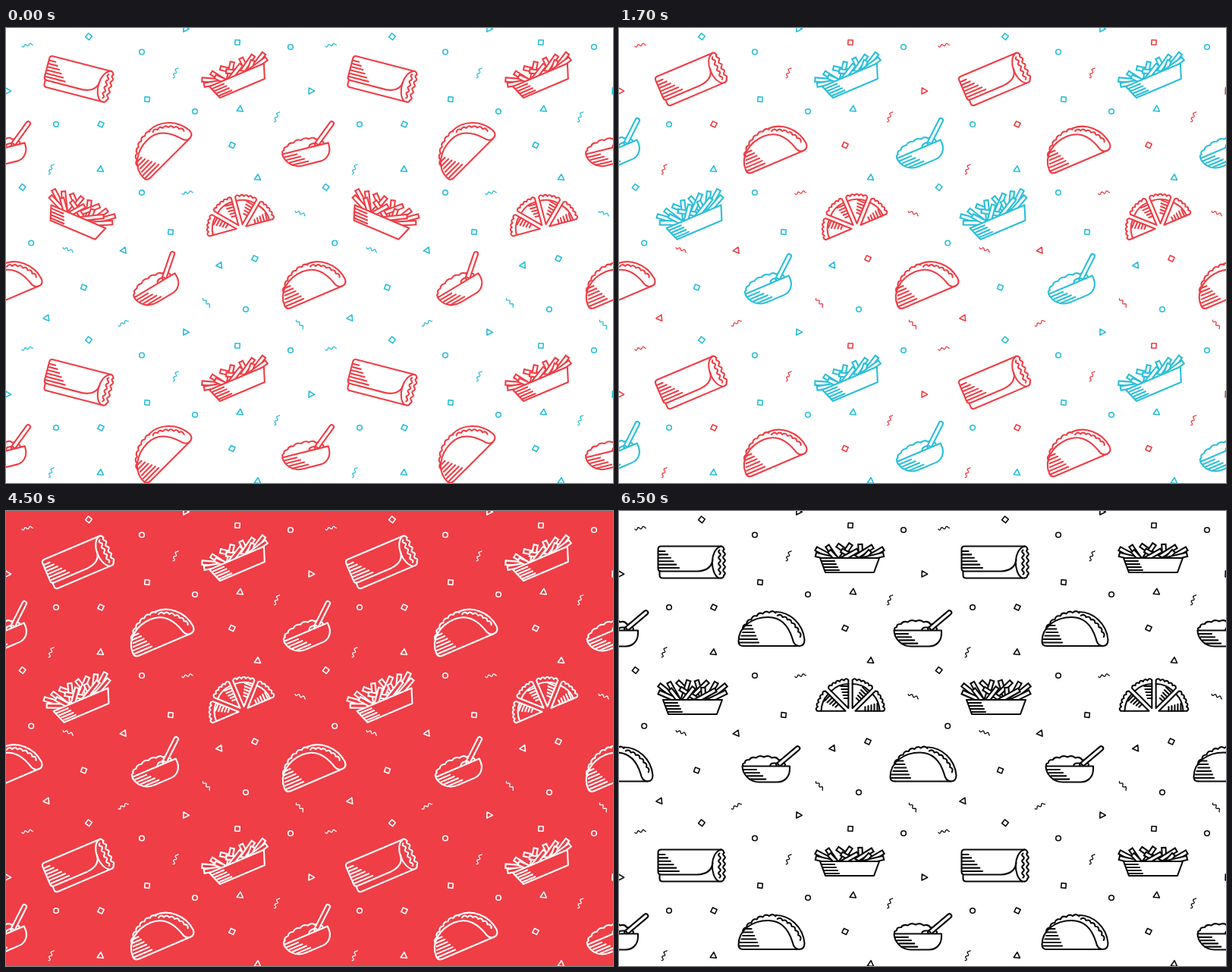
Animation, 800 px wide and 600 px high, one loop 8000 ms. Source, as an HTML page with a canvas:

```html
<!DOCTYPE html>
<html lang="en">
<head>
<meta charset="utf-8">
<title>Snack pattern</title>
<style>
html, body { margin: 0; width: 100%; height: 100%; overflow: hidden; background: #fff; }
canvas { display: block; }
</style>
</head>
<body>
<canvas id="c" width="800" height="600"></canvas>
<script>
const ctx = document.getElementById('c').getContext('2d');
const RED = '#ef3e46', TEAL = '#2bbfd9', WHITE = '#ffffff', BLACK = '#0a0a0a';
const LOOP = 8000, TILE = 400, RAD = Math.PI / 180, LINE = 2.1;
let paper;

function stroke(d) { ctx.stroke(new Path2D(d)); }

function solid(d) {
  const p = new Path2D(d);
  ctx.fillStyle = paper;
  ctx.fill(p);
  ctx.stroke(p);
}

// n bumps along an elliptic arc, bulging outwards by h
function bumps(cx, cy, rx, ry, from, to, n, h) {
  const at = (i, grow) => {
    const a = (from + (to - from) * i / n) * RAD;
    return `${cx + (rx + grow) * Math.cos(a)} ${cy + (ry + grow) * Math.sin(a)}`;
  };
  let d = 'M' + at(0, 0);
  for (let i = 1; i <= n; i++) d += `Q${at(i - .5, h)} ${at(i, 0)}`;
  return d;
}

// Horizontal shading: each row starts slant further on and is grow longer
function hatch(x, y, step, n, len, grow, slant = 0) {
  for (let i = 0; i < n; i++) stroke(`M${x + slant * i} ${y + step * i}h${len + grow * i}`);
}

function squiggle(len, amp, cycles) {
  ctx.beginPath();
  for (let x = 0; x <= len; x += .5) {
    ctx.lineTo(x - len / 2, amp * Math.sin(x / len * cycles * 2 * Math.PI));
  }
  ctx.stroke();
}

// Outlined bar filled with the paper colour
function bar(x1, y1, x2, y2, width, cap) {
  const color = ctx.strokeStyle;
  ctx.save();
  ctx.lineCap = cap;
  for (const [c, w] of [[color, width], [paper, width - 2 * LINE]]) {
    ctx.strokeStyle = c;
    ctx.lineWidth = w;
    stroke(`M${x1} ${y1}L${x2} ${y2}`);
  }
  ctx.restore();
}

function place(draw, x, y, deg) {
  ctx.save();
  ctx.translate(x, y);
  ctx.rotate(deg * RAD);
  draw();
  ctx.restore();
}

function burrito() {
  stroke('M39-21H-40Q-44-21-44-17V8Q-44 12-40 12H8Q26 11 28-3');
  stroke('M-42 12V17Q-42 21-38 21H39');
  stroke('M39-21C24-17 24 14 36 21');
  stroke('M39-21q3 0 4 4M43 17q-1 4-4 4');
  place(() => squiggle(34, 1.3, 4), 43, 0, 90);
  place(() => squiggle(32, 1.3, 4), 37, 0, 90);
  hatch(-43, -14.5, 4.4, 6, 8, 3.7);
}

function taco() {
  stroke('M-37 22H37Q44 22 44 14C42-8 24-23 6-23');
  stroke('M-37 22Q-43 22-43 16C-43-4-24-16-4-16C13-16 23-4 28 12Q30 22 37 22');
  stroke(bumps(0, 22, 43, 44, 210, 278, 6, 4));
  stroke(bumps(0, 22, 40, 41, 282, 343, 6, 4));
  hatch(-34, -5, 4.5, 6, 8, 3.6, -1.7);
}

function bowl() {
  stroke(bumps(-9, 2, 27, 12, 180, 360, 8, 3.5));
  bar(10, 0, 35.5, -21.5, 7.6, 'round');
  stroke(bumps(5, 2, 6, 4, 180, 360, 2, 2));
  solid('M-37.5 2H25V6C25 17 17 23 9 23H-15C-28 23-37 13-37.5 2Z');
  hatch(-36, 6.5, 4.2, 4, 17, 1.5, 2.6);
}

function tray(y) {
  solid(`M-39 ${y}H39L32 ${y + 19}H-32Z`);
  hatch(-37, y + 4, 4, 4, 17, .5, 1.5);
}

// One row of fries, the outer ones leaning outwards, the inner ones crossing
function fries(n, rim, height) {
  for (let i = 0; i < n; i++) {
    const t = 2 * i / (n - 1) - 1;
    const lean = Math.max(-1, Math.min(1, t * 1.4 + (i % 2 ? .5 : -.5)));
    bar(42 * t, rim - height + 5 * t * t, 42 * t - 25 * lean, rim + 2, 7.4, 'square');
  }
}

function friesLow() {
  fries(7, 0, 16);
  fries(6, 0, 9);
  tray(0);
}

function friesHigh() {
  fries(8, 4, 23);
  fries(7, 4, 14);
  tray(4);
}

function pie() {
  for (let k = 1; k <= 4; k++) {
    place(() => {
      ctx.translate(7 * Math.cos(-22.5 * RAD), 7 * Math.sin(-22.5 * RAD));
      stroke(bumps(0, 0, 37, 37, -45, 0, 5, 4) + 'L0 0Z');
      stroke(bumps(0, 0, 32, 32, -45, 0, 1, 2.5));
      for (let x = 13; x < 31; x += 4) stroke(`M${x} 0v${-2 - x * .28}`);
    }, 0, 22, 180 + 45 * k);
  }
}

function square() { ctx.strokeRect(-3.1, -3.1, 6.2, 6.2); }
function ring() {
  ctx.beginPath();
  ctx.arc(0, 0, 3.3, 0, 7);
  ctx.stroke();
}
function triangle() { stroke('M4.8 0L-2.6-4.1V4.1Z'); }
function wave() { squiggle(14.5, 1.4, 2.25); }

// draw, x, y, first tilt, colour in the mixed scene
const TILT = -23;
const FOOD = [
  [burrito, 95.5, 67.5, 14.5, RED],
  [friesLow, 304, 62, TILT, TEAL],
  [taco, 200.5, 156, -45, RED],
  [bowl, 400, 155.5, -14, TEAL],
  [friesHigh, 97, 245, 23, TEAL],
  [pie, 305, 244.5, -15, RED],
  [bowl, 200, 334.5, -31, TEAL],
  [taco, 400.5, 334.5, TILT, RED]
];

// draw, angle, colour in the mixed scene, places
const BITS = [
  [square, 38, TEAL, [[109, 11.3], [21.7, 210]]],
  [square, 5, TEAL, [[186, 94], [217, 269]]],
  [square, 20, TEAL, [[102.5, 342]]],
  [square, 26, RED, [[125, 127], [298, 154.5], [328, 304]]],
  [square, 4, RED, [[305, 19]]],
  [ring, 0, TEAL, [[179, 31.5], [375, 25], [249, 110], [66, 127], [179, 217], [33.2, 283.5], [316, 371]]],
  [triangle, 2, TEAL, [[236.5, 1]]],
  [triangle, 2, RED, [[401.8, 83]]],
  [triangle, -85, TEAL, [[308.5, 107], [124.5, 186.5], [331.7, 197.5]]],
  [triangle, 174, TEAL, [[281.5, 313]]],
  [triangle, 174, RED, [[155, 293.3], [53.7, 382.4]]],
  [wave, -12, RED, [[28, 22.5], [239, 217]]],
  [wave, -30, RED, [[154.5, 389]]],
  [wave, -68, RED, [[223, 59], [356.5, 117], [59, 186]]],
  [wave, 20, RED, [[388, 244], [82, 292]]],
  [wave, 48, RED, [[264.5, 362], [387.5, 390.5]]]
];

// A scene without ink uses the mixed colours; without tilt the food is upright
const SCENES = [
  { end: 500, paper: WHITE, ink: RED, bits: TEAL, tilt: first => first },
  { end: 2500, paper: WHITE, tilt: () => TILT },
  { end: 4500, paper: TEAL, ink: WHITE, bits: WHITE, tilt: () => TILT },
  { end: 6500, paper: RED, ink: WHITE, bits: WHITE, tilt: () => TILT },
  { end: LOOP, paper: WHITE, ink: BLACK, bits: BLACK, tilt: () => 0 }
];

function tile(s) {
  for (const [draw, angle, mixed, spots] of BITS) {
    ctx.strokeStyle = s.bits || mixed;
    ctx.lineWidth = draw === wave ? 1.3 : 1.6;
    for (const [x, y] of spots) place(draw, x, y, angle);
  }
  ctx.lineWidth = LINE;
  for (const [draw, x, y, first, mixed] of FOOD) {
    ctx.strokeStyle = s.ink || mixed;
    place(draw, x, y, s.tilt(first));
  }
}

function render(t) {
  const s = SCENES.find(k => t < k.end);
  paper = s.paper;
  ctx.fillStyle = paper;
  ctx.fillRect(0, 0, 800, 600);
  ctx.lineJoin = ctx.lineCap = 'round';
  for (let i = -1; i < 3; i++) {
    for (let j = -1; j < 2; j++) {
      ctx.save();
      ctx.translate(i * TILE, j * TILE);
      tile(s);
      ctx.restore();
    }
  }
}

const start = performance.now();
function loop() {
  render((performance.now() - start) % LOOP);
  requestAnimationFrame(loop);
}
loop();
</script>
</body>
</html>
```
